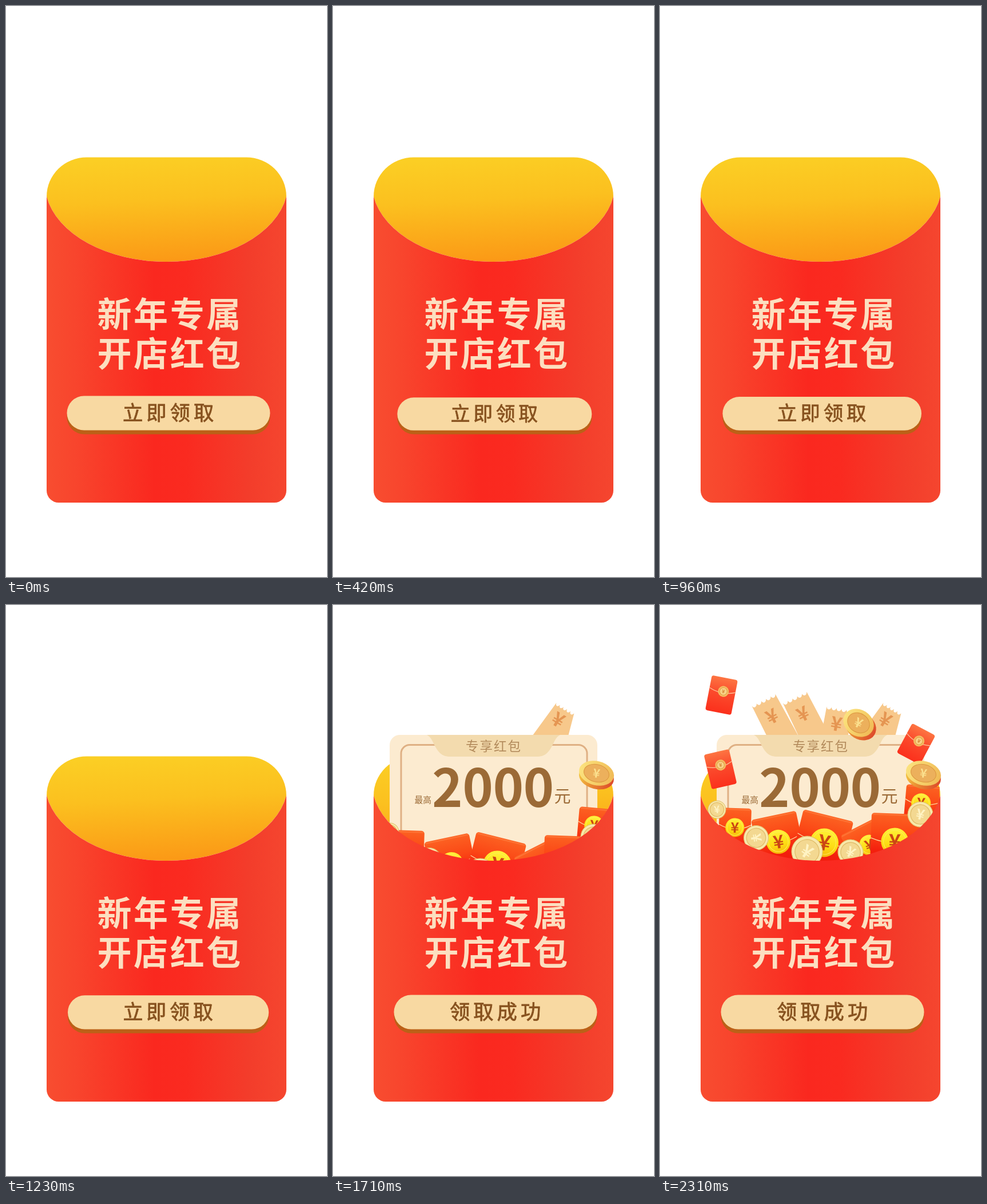
These frames come from a looping animation (561x998 px, 4.74 s). An HTML page:

```html
<!DOCTYPE html>
<html lang="zh-CN">
<head>
<meta charset="utf-8">
<style>
html, body { margin: 0; width: 100%; height: 100%; overflow: hidden; background: #fff; }
svg { display: block; width: 100vw; height: 100vh; }
text { font-family: "Noto Sans CJK SC", "Noto Sans CJK", sans-serif; }
#action { stroke: #87521f; stroke-width: 0.8; }
</style>
</head>
<body>
<svg id="stage" viewBox="0 0 561 998" preserveAspectRatio="none"></svg>
<script>
const LOOP = 4740, STEP = 30, OPEN = 1500;
const stage = document.getElementById('stage');

const gradient = (id, dir, ...stops) => `<linearGradient id="${id}" ${dir}>` +
  stops.map(([at, color]) => `<stop offset="${at}" stop-color="${color}"/>`).join('') + '</linearGradient>';
const at = (x, y, turn, body) => `<g transform="translate(${x} ${y}) rotate(${turn})">${body}</g>`;
const label = (x, y, size, weight, color, gap, words, id = '') =>
  `<text ${id && `id="${id}"`} x="${x}" y="${y}" font-size="${size}" font-weight="${weight}" fill="${color}" letter-spacing="${gap}">${words}</text>`;
const yen = (size, color, turn = 0) =>
  `<text y="${size * 0.36}" font-size="${size}" font-weight="700" text-anchor="middle" fill="${color}" transform="rotate(${turn})">¥</text>`;

// Flat yellow coin stuck on a packet.
const seal = r => `<circle r="${r}" fill="url(#seal)"/><circle r="${r * 0.82}" fill="none" stroke="#ffec55" stroke-width="1"/>` +
  yen(r * 1.5, '#cb4614');

const paleCoin = (x, y, r, turn) => at(x, y, turn,
  `<circle r="${r}" fill="#f8e8ac" stroke="#dfc06c" stroke-width="1"/>
   <circle r="${r * 0.78}" fill="#f3d891" stroke="#dfba66" stroke-width="1.2"/>` + yen(r * 1.15, '#fff3c4'));

// Packet hung from its top-left corner; the seal sits at (sx, sy).
const packet = (x, y, turn, w, sx, sy, r) => at(x, y, turn,
  `<rect width="${w}" height="130" rx="5" fill="url(#packet)"/>
   <path d="M3 2.5H${w - 3}" stroke="#ff7a3c" stroke-width="2.5" stroke-linecap="round" opacity=".7"/>
   <path d="M0 ${sy - 5}Q${sx} ${sy + 11} ${w} ${sy - 5}" fill="none" stroke="#ffd9a0" stroke-width="1.3"/>
   <g transform="translate(${sx} ${sy}) rotate(${-turn * 0.3})">${seal(r)}</g>`);

const flyerArt = (w, h) => `<rect x="${-w / 2}" y="${-h / 2}" width="${w}" height="${h}" rx="4" fill="url(#flyer)"/>
  <path d="M${-w / 2} -9Q0 1 ${w / 2} -9" fill="none" stroke="#ffc59a" stroke-width="1.2"/>
  <g transform="translate(2 -7)"><circle r="9.5" fill="#f4bd62"/><circle r="6.5" fill="#f8d286" stroke="#e09a45" stroke-width="1"/>${yen(9, '#d8873a')}</g>`;

const tiltCoin = (rx, ry, dx, dy) => `<ellipse cx="${dx}" cy="${dy}" rx="${rx}" ry="${ry}" fill="url(#rim)"/>
  <ellipse rx="${rx}" ry="${ry}" fill="url(#gold)"/>
  <ellipse rx="${rx * 0.72}" ry="${ry * 0.72}" fill="#ecb05c" stroke="#dc963f" stroke-width="1"/>` + yen(ry, '#fbe08e', -6);

// Ticket stub with a torn top edge, hanging from its top middle and widening by flare.
function ticketArt(w, signY, flare) {
  const n = 5, s = w / n;
  const teeth = Array.from({ length: n }, () => `q${s * 0.15} 5 ${s * 0.5} 4.5t${s * 0.5} -4.5`).join('');
  return `<path d="M${-w / 2} 0${teeth}L${w / 2 + flare} 95H${-w / 2 - flare * 0.3}Z" fill="#f7c88b"/>
    <g transform="translate(0 ${signY})">${yen(34, '#e59552')}</g>`;
}

const tickets = [
  { x: 181, y: 166, turn: -27, w: 46, sign: 32, flare: 3, start: 2220, span: 90 },
  { x: 235.5, y: 161.5, turn: -26, w: 46, sign: 32, flare: 3, start: 1890, span: 120 },
  { x: 313, y: 181, turn: 10, w: 44, sign: 27, flare: 4, start: 1800, span: 120 },
  { x: 406, y: 180, turn: 31, w: 36, sign: 24, flare: 28, start: 1590, span: 120 }
];
const flyers = [
  { x: 447.5, y: 243, turn: 28, w: 46, h: 58, from: [400, 480], start: 1800 },
  { x: 105.5, y: 287, turn: -13, w: 45, h: 62, from: [165, 480], start: 1875 },
  { x: 107.5, y: 157.5, turn: 11, w: 46, h: 62, from: [190, 490], start: 1950 }
];

const mouth = 'M71 333A212.5 137 0 0 0 490 333';
const brown = '#9b6a36';

stage.innerHTML = `<defs>
  ${gradient('red', '', [0, '#f84d30'], [0.12, '#f8452d'], [0.45, '#fa281f'], [0.58, '#fa2a20'], [0.85, '#f33d2b'], [1, '#f5462f'])}
  ${gradient('flap', 'x1=".45" y1="0" x2=".58" y2="1"', [0, '#fbce24'], [0.4, '#fbc01f'], [1, '#fb9816'])}
  ${gradient('packet', 'x1="0" y1="0" x2="0" y2="1"', [0, '#fc6222'], [0.25, '#fb4816'], [0.5, '#f4200e'], [1, '#e9120c'])}
  ${gradient('flyer', 'x1="0" y1="0" x2="0" y2="1"', [0, '#fd7542'], [0.45, '#fb4a2c'], [1, '#fb301c'])}
  ${gradient('seal', 'x1="0" y1="0" x2="0" y2="1"', [0, '#fff23a'], [0.6, '#fddc13'], [1, '#f6b60b'])}
  ${gradient('gold', '', [0, '#fbe27e'], [0.5, '#f6d06a'], [1, '#f0ba56'])}
  ${gradient('rim', '', [0, '#f2c443'], [0.4, '#e98a33'], [1, '#dd4a2b'])}
  <clipPath id="inside"><path d="M72.5 200H488.5V868H72.5Z"/></clipPath>
</defs>
<path d="${mouth}A70 68.5 0 0 0 420 264.5H141A70 68.5 0 0 0 71 333Z" fill="url(#flap)"/>
${tickets.map((k, i) => `<g id="ticket${i}">${ticketArt(k.w, k.sign, k.flare)}</g>`).join('')}
<g id="card">
  <rect x="99" y="227" width="363" height="300" rx="18" fill="#fcebd0"/>
  <rect x="119" y="244.5" width="325" height="270" rx="15" fill="none" stroke="#dfb084" stroke-width="3"/>
  <path d="M164 227H397C389 231 387 239 382 248Q373 265 359 265H202Q188 265 179 248C174 239 172 231 164 227Z" fill="#f3dbae"/>
  ${label(232, 255, 22.5, 400, '#b28a5b', 2, '专享红包')}
  ${label(142.5, 346, 14.7, 400, brown, 0, '最高')}
  ${label(173, 352.5, 91, 700, brown, -0.5, '2000')}
  ${label(386.5, 344.5, 29, 400, brown, 0, '元')}
</g>
<g clip-path="url(#inside)"><g id="pack">
  ${packet(431, 313, 5, 64, 28, 31, 17)}
  ${packet(104, 354, 2, 56, 28, 34, 16.5)}
  ${packet(159, 376, -12, 80, 39, 47, 21)}
  ${packet(251, 357, 14, 90, 49, 48, 25)}
  ${packet(315, 403, -27, 84, 38, 38, 18)}
  ${packet(370, 363, 2, 88, 42, 49, 24)}
  ${paleCoin(99.5, 357.5, 15.5, -8)}
  ${paleCoin(168, 407, 21.5, 80)}
  ${paleCoin(257, 431, 27, 35)}
  ${paleCoin(333, 432, 22, 28)}
  ${paleCoin(455, 366, 22, 12)}
</g></g>
<g id="coinTop">${tiltCoin(28, 23, 6.6, 3)}</g>
${flyers.map((f, i) => `<g id="flyer${i}">${flyerArt(f.w, f.h)}</g>`).join('')}
<g id="coinSide">${tiltCoin(31, 21, 1.5, 6.5)}</g>
<path d="${mouth}V847A21 21 0 0 1 469 868H92A21 21 0 0 1 71 847Z" fill="url(#red)"/>
${label(159.5, 560.5, 60, 700, '#fcdfc0', 3.6, '新年专属')}
${label(159.5, 629.5, 60, 700, '#fcdfc0', 3.6, '开店红包')}
<g id="button">
  <rect x="106.5" y="688.5" width="355" height="60" rx="30" fill="#bc6017"/>
  <rect x="106.5" y="681.5" width="355" height="60" rx="30" fill="#f8d9a2"/>
  ${label(204, 723.5, 35.3, 500, '#87521f', 6, '', 'action')}
</g>`;

const $ = id => document.getElementById(id);
const place = (id, value) => $(id).setAttribute('transform', value);
const progress = (t, start, span) => Math.min(1, Math.max(0, (t - start) / span));
const rest = (t, start, span, power = 2) => (1 - progress(t, start, span)) ** power;
const mix = (a, b, p) => a + (b - a) * p;

function draw(t) {
  // Five linear pulses of 300 ms before the envelope opens.
  const phase = t % 300 / 150;
  const dip = t < OPEN ? Math.min(phase, 2 - phase) : 0;
  place('button', `translate(245 749) scale(${1 - 0.053 * dip}) translate(-245 -749)`);
  $('action').textContent = t < OPEN ? '立即领取' : '领取成功';

  const drop = 264 * rest(t, OPEN, 180, 2.44);
  place('card', `translate(0 ${drop})`);
  const slide = rest(t, OPEN, 210, 1);
  place('coinSide', `translate(${460.5 - 48 * slide} ${294 + drop + 4 * slide}) rotate(${14 + 36 * slide}) scale(${1 - 0.17 * slide})`);
  place('pack', `translate(0 ${100 * rest(t, 1620, 240)})`);

  tickets.forEach((k, i) => {
    const left = rest(t, k.start, k.span);
    $('ticket' + i).style.display = left < 1 ? '' : 'none';
    place('ticket' + i, `translate(${k.x} ${k.y}) rotate(${k.turn}) translate(0 ${80 * left})`);
  });

  const hop = 1 - rest(t, 1740, 150);
  place('coinTop', `translate(${mix(325, 347, hop)} ${mix(490, 206, hop)}) rotate(${mix(90, 32, hop)})`);

  flyers.forEach((f, i) => {
    const p = 1 - rest(t, f.start, 180);
    place('flyer' + i, `translate(${mix(f.from[0], f.x, p)} ${mix(f.from[1], f.y, p)}) rotate(${f.turn * p}) scale(${mix(0.4, 1, p)})`);
  });
}

const begin = performance.now();
function tick() {
  const t = (performance.now() - begin) % LOOP;
  draw(Math.floor(t / STEP) * STEP);
  requestAnimationFrame(tick);
}
tick();
</script>
</body>
</html>
```
